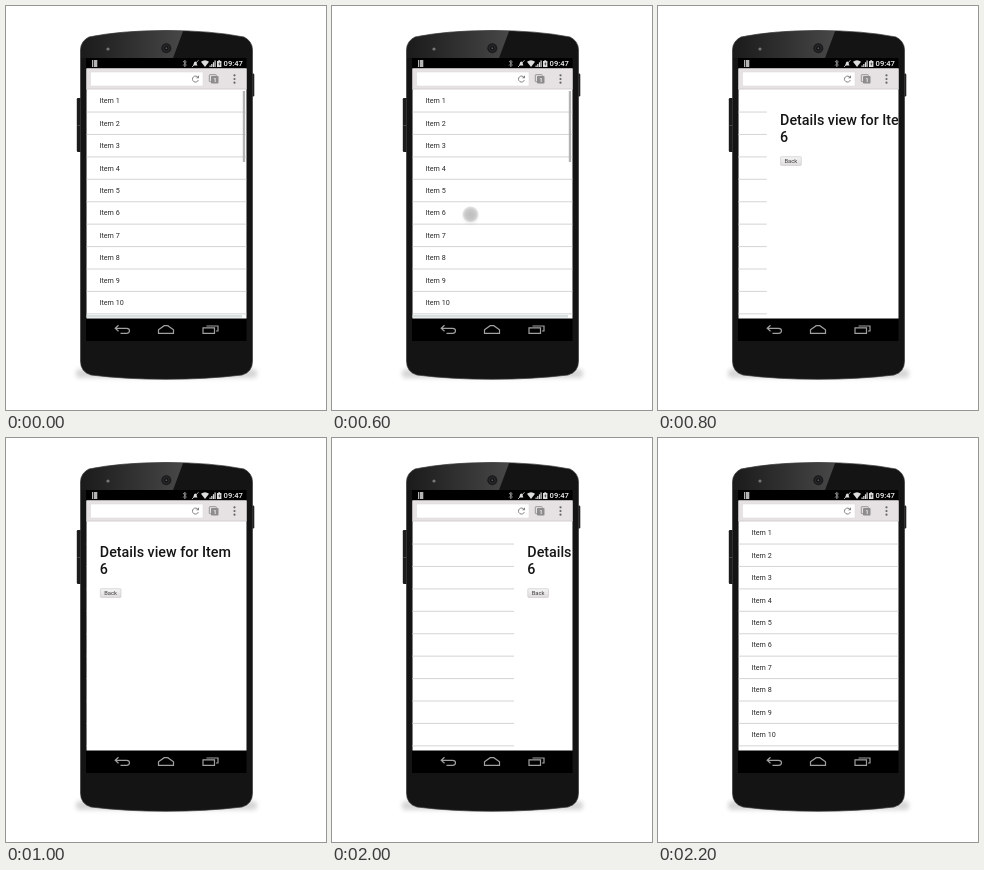
Recreate the animation shown at these times as an HTML page. Size 320x404 px, loop 2.4 s.

```html
<!DOCTYPE html>
<html lang="en">
<head>
<meta charset="utf-8">
<title>List and details</title>
<style>
  html, body { margin: 0; width: 100%; height: 100%; overflow: hidden; background: #fff; }
  svg { display: block; width: 100%; height: 100%; font-family: Roboto, sans-serif; }
</style>
</head>
<body>
<svg viewBox="0 0 320 404">
  <defs>
    <linearGradient id="gloss" x1="0" y1="0" x2="1" y2="0">
      <stop offset="0" stop-color="#555" stop-opacity=".1"/>
      <stop offset="1" stop-color="#5a5a5a" stop-opacity=".75"/>
    </linearGradient>
    <linearGradient id="btn" x1="0" y1="0" x2="0" y2="1">
      <stop offset="0" stop-color="#f6f5f5"/>
      <stop offset="1" stop-color="#dedcdd"/>
    </linearGradient>
    <radialGradient id="disc">
      <stop offset="0" stop-color="#3a3538" stop-opacity=".54"/>
      <stop offset=".6" stop-color="#3a3538" stop-opacity=".46"/>
      <stop offset=".85" stop-color="#3a3538" stop-opacity=".3"/>
      <stop offset="1" stop-color="#3a3538" stop-opacity=".04"/>
    </radialGradient>
    <radialGradient id="shade">
      <stop offset=".3" stop-color="#000" stop-opacity=".16"/>
      <stop offset="1" stop-color="#000" stop-opacity="0"/>
    </radialGradient>
    <filter id="blur" x="-20%" y="-100%" width="140%" height="300%"><feGaussianBlur stdDeviation="2"/></filter>
    <clipPath id="page"><rect x="80.500" y="83.500" width="160" height="229"/></clipPath>
    <path id="shell" d="M74.500 44Q74.700 35 83 31Q115 24.500 160 24.500T238 31Q246.300 35 246.500 44V355Q246.500 366 236 369Q200 373.300 160 373.300T85 369Q74.500 366 74.500 355Z"/>
    <clipPath id="inside"><use href="#shell"/></clipPath>
  </defs>
  <rect width="320" height="404" fill="#fff"/>

  <rect x="70" y="363" width="181" height="9" rx="4" fill="#999" opacity=".4" filter="url(#blur)"/>
  <rect x="70.800" y="92" width="5" height="54" rx="1.200" fill="#1c1c1c"/>
  <path d="M71.500 119.500h3" stroke="#555" stroke-width=".8"/>
  <rect x="245" y="67.500" width="3.300" height="23" rx="1.200" fill="#222"/>
  <use href="#shell" fill="#141414"/>
  <path d="M74 20H179L167 52H74Z" fill="url(#gloss)" clip-path="url(#inside)"/>
  <use href="#shell" fill="none" stroke="#3c3c3c" stroke-width=".7"/>
  <circle cx="160.300" cy="42.300" r="5" fill="#1c1b1d"/>
  <circle cx="160.300" cy="42.300" r="2.800" fill="#111" stroke="#3a383c" stroke-width=".7"/>
  <circle cx="160.300" cy="42.300" r="1" fill="#55505a"/>
  <circle cx="102" cy="43" r="1.600" fill="#777"/>

  <rect x="80" y="52" width="160.500" height="283" fill="#000"/>
  <g fill="#ddd">
    <path d="M86 54h1.300v7H86zM88 54h3.300v7H88z" fill="#b5b5b5"/>
    <path d="M177 55l3.300 4-1.600 1.800v-6.600l1.600 1.800-3.300 3.600" fill="none" stroke="#888" stroke-width="1"/>
    <path d="M187 59.500c1-1 .6-4 2.300-4s1.300 3 2.300 4z"/>
    <path d="M186 61l6.500-6.800" stroke="#ddd" stroke-width=".8"/>
    <path d="M195 55.800q4-3 8 0l-4 5.200z"/>
    <path d="M203.500 61h1.200v-1.500h-1.200zM205.200 61h1.200v-3h-1.200zM206.900 61h1.200v-4.800h-1.200zM208.500 61h1.200v-6.500h-1.200z"/>
    <path d="M211 55h1.300v-.8h1.800v.8h1.300v6H211z"/>
    <path d="M213.700 55.800l-1.400 2.500h1l-.3 2 1.500-2.700h-1z" fill="#333"/>
  </g>
  <text x="217.600" y="60.300" font-size="7.600" font-weight="500" fill="#f2f2f2">09:47</text>

  <rect x="80.500" y="62.500" width="160" height="250" fill="#fff"/>
  <rect x="80.500" y="62.500" width="160" height="20.500" fill="#e6e2e4"/>
  <rect x="80.500" y="82.500" width="160" height="1" fill="#d3ced1"/>
  <rect x="84.500" y="66" width="112.500" height="14" fill="#fff" stroke="#dcd8db" stroke-width=".5"/>
  <path d="M192.100 71.600a3 3 0 1 0 .2 2.500" fill="none" stroke="#858285" stroke-width="1"/>
  <path d="M193 69.300v3h-3z" fill="#858285"/>
  <rect x="203.300" y="68.700" width="7" height="7" rx=".6" fill="#e6e2e4" stroke="#8f8c8e" stroke-width=".9"/>
  <rect x="205" y="70" width="7.500" height="7.500" rx=".8" fill="#8f8c8e"/>
  <text x="207.200" y="75.900" font-size="6" font-weight="bold" fill="#f2f0f1">1</text>
  <g fill="#666"><circle cx="228.500" cy="69.300" r="1.100"/><circle cx="228.500" cy="73" r="1.100"/><circle cx="228.500" cy="76.700" r="1.100"/></g>

  <g clip-path="url(#page)">
    <g id="list"></g>
    <g id="details">
      <g font-size="14.300" font-weight="500" fill="#151515">
        <text x="93.800" y="119.200">Details view for Item</text>
        <text x="93.800" y="136.200">6</text>
      </g>
      <rect x="94.300" y="150.700" width="20.700" height="8.700" rx=".8" fill="url(#btn)" stroke="#c8c5c7" stroke-width=".6"/>
      <text x="98.200" y="157" font-size="5.800" fill="#3a3a3a">Back</text>
    </g>
    <rect id="bar" x="236.800" y="85" width="2.300" height="71" fill="#b4b4b4"/>
    <rect id="edge" x="80" y="309" width="156" height="2.500" fill="#d5dfdd"/>
  </g>
  <g id="touch">
    <circle cy="2" r="10" fill="url(#shade)"/>
    <circle r="8.300" fill="url(#disc)"/>
  </g>

  <g fill="none" stroke="#a0a0a0" stroke-width="1.200">
    <path d="M112.500 319.300l-3.300 3 3.300 3M109.500 322.300h11q3 0 3 2.500t-3 2.500h-6"/>
    <path d="M152.500 323.700l5.700-4h3.600l5.700 4v3.600h-15z"/>
    <path d="M197 321.800h11.500v5.500H197zM200.500 320h11.500v5h-2"/>
  </g>
</svg>
<script>
const LOOP = 2400, STEP = 100, WIDTH = 160;
const $ = id => document.getElementById(id);
const list = $('list'), details = $('details'), touch = $('touch');

let rows = '';
for (let i = 0; i < 10; i++) {
  const y = 84 + 22.42 * i;
  rows += `<text x="93.500" y="${y + 13.3}" font-size="7.200" fill="#2a2a2a">Item ${i + 1}</text>` +
    `<rect x="80.500" y="${y + 21.5}" width="160" height="1.100" fill="#d8d8d8"/>`;
}
list.innerHTML = rows;

// CSS "ease": cubic-bezier(.25, .1, .25, 1)
function ease(x) {
  if (x <= 0) return 0;
  if (x >= 1) return 1;
  const bez = (u, a, b) => 3 * u * (1 - u) ** 2 * a + 3 * u * u * (1 - u) * b + u ** 3;
  let lo = 0, hi = 1;
  for (let i = 0; i < 24; i++) {
    const mid = (lo + hi) / 2;
    if (bez(mid, .25, .25) < x) lo = mid; else hi = mid;
  }
  return bez(lo, .1, 1);
}

function touchAlpha(t) {
  if (t >= 1800) return t < 2000 ? 1 : 0;
  const fadeIn = (t - 100) / 300, fadeOut = (700 - t) / 200;
  return Math.max(0, Math.min(1, fadeIn, fadeOut));
}

function draw(time) {
  const t = Math.floor(time % LOOP / STEP) * STEP;
  const shown = t < 1900 ? ease((t - 633) / 320) : 1 - ease((t - 1908) / 250);
  const x = WIDTH * shown;
  list.setAttribute('transform', `translate(${-x} 0)`);
  details.setAttribute('transform', `translate(${WIDTH - x} 0)`);

  const scrollable = t < 700 ? 1 : 0;
  $('bar').setAttribute('opacity', scrollable);
  $('edge').setAttribute('opacity', scrollable);

  const spot = t < 1000 ? '138.5 208.3' : '104.5 155.2';
  touch.setAttribute('transform', `translate(${spot})`);
  touch.setAttribute('opacity', touchAlpha(t));
}

const start = performance.now();
function tick() {
  draw(performance.now() - start);
  requestAnimationFrame(tick);
}
tick();
</script>
</body>
</html>
```
